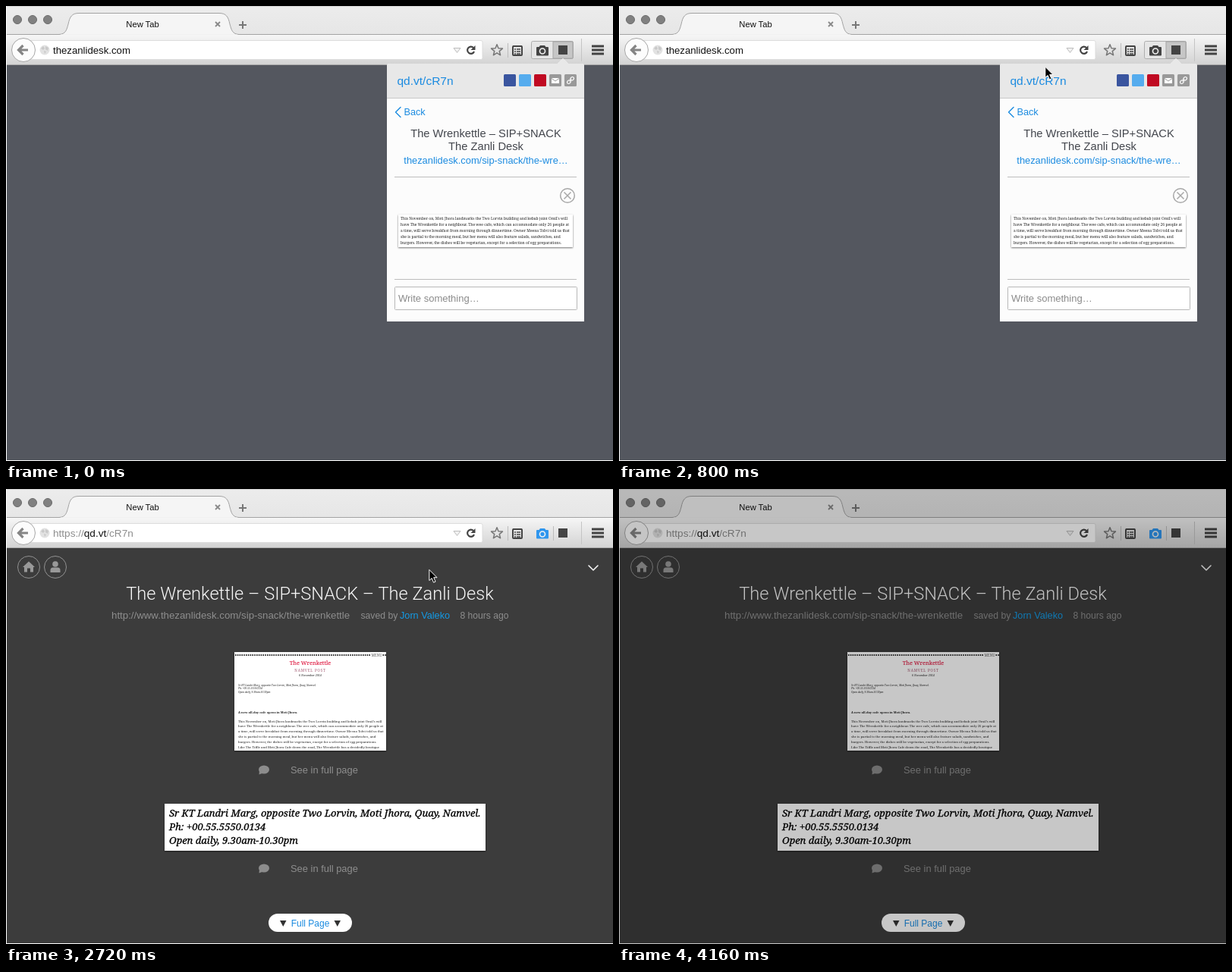
Recreate the animation shown at these times as an HTML page. Size 800 by 600 pixels, loop 4180 ms.

```html
<!DOCTYPE html>
<html lang="en">
<head>
<meta charset="utf-8">
<title>Saved page</title>
<style>
html, body { margin: 0; width: 100%; height: 100%; overflow: hidden; background: #fff; }
svg { display: block; width: 100vw; height: 100vh; }
text { font-family: "Liberation Sans", Arial, sans-serif; white-space: pre; }
.serif text, text.serif { font-family: "Noto Serif", Georgia, serif; }
.light { font-family: Roboto, "Open Sans", sans-serif; font-weight: 300; }
.mid { text-anchor: middle; }
.line { fill: none; stroke-linecap: round; stroke-linejoin: round; }
</style>
</head>
<body>
<svg viewBox="0 0 800 600" xmlns="http://www.w3.org/2000/svg">
  <defs>
    <linearGradient id="bar" x2="0" y2="1">
      <stop stop-color="#f6f6f6"/><stop offset="1" stop-color="#d3d3d3"/>
    </linearGradient>
    <linearGradient id="top" x2="0" y2="1">
      <stop stop-color="#ececec"/><stop offset="1" stop-color="#e6e6e6"/>
    </linearGradient>
    <filter id="shadow" x="-10%" y="-20%" width="120%" height="150%">
      <feDropShadow dx="0" dy="1" stdDeviation="1.3" flood-opacity=".55"/>
    </filter>
    <clipPath id="thumb"><rect x="301" y="215" width="200" height="130"/></clipPath>
    <g id="bubble" fill="#8c8c8c">
      <ellipse rx="7" ry="5.6"/><path d="M-6 1L-6.5 6.5L0 4Z"/>
    </g>
    <g id="camera">
      <path d="M-7 -4.500h2.500l1.500 -2h6l1.500 2H7q1 0 1 1V6q0 1 -1 1H-7q-1 0 -1 -1V-3.500q0 -1 1 -1Z"/>
      <circle cy="1" r="3.500" fill="none" stroke="#f2f2f2" stroke-width="1.600"/>
    </g>
  </defs>

  <!-- browser frame -->
  <rect width="800" height="600" fill="#fff"/>
  <rect x="1" width="799" height="38" fill="url(#top)"/>
  <path d="M1 .5H800" stroke="#d2d2d2"/>
  <rect x="1" y="38" width="799" height="39" fill="url(#bar)"/>
  <path d="M1 37.5H70C79 37 80 31 82 24C84 14 87 9.5 96 9.5H281C290 9.5 293 14 295 24C297 31 298 37 307 37.5H800" fill="#f5f5f5" stroke="#a3a3a3"/>
  <path d="M72 38.5H305" stroke="#f5f5f5" stroke-width="2"/>
  <path d="M1 77.5H800" stroke="#a9a9a9"/>
  <g fill="#808080" stroke="#6b6b6b">
    <circle cx="15" cy="18" r="5.5"/><circle cx="35" cy="18" r="5.5"/><circle cx="55" cy="18" r="5.5"/>
  </g>
  <text x="180" y="28" class="mid" font-size="11.2" fill="#111">New Tab</text>
  <path d="M276 21l6 6m0 -6l-6 6" stroke="#888" stroke-width="1.8"/>
  <path d="M307 25h10m-5 -5v10" stroke="#777" stroke-width="2"/>

  <rect x="24" y="45.5" width="604" height="25" rx="2" fill="#fff" stroke="#dcdcdc"/>
  <circle cx="23" cy="58" r="15.5" fill="#fcfcfc" stroke="#a6a6a6"/>
  <path d="M22.5 52L16.5 58L22.5 64M17.500 58H29" fill="none" stroke="#858585" stroke-width="3.2"/>
  <circle cx="51" cy="58" r="6.5" fill="#e2e2e2"/>
  <path d="M46 56l3 -3 2 3 -2 2zm6 -3l4 2 -1 4 -3 -2zm-2 6l3 1 -2 3z" fill="#c9c9c9"/>
  <path d="M590 55.5h9l-4.500 6z" fill="#f2f2f2" stroke="#bdbdbd"/>
  <path d="M616 55A4.600 4.600 0 1 0 617 60" fill="none" stroke="#444" stroke-width="2.2"/>
  <path d="M618.5 52v6h-6z" fill="#444"/>
  <path id="star" class="line" stroke="#777" stroke-width="1.5"/>
  <path d="M661.5 49V68" stroke="#bcbcbc"/>
  <path d="M758.5 43V73" stroke="#c4c4c4"/>
  <rect x="668" y="53" width="12" height="12" rx="1" fill="none" stroke="#444" stroke-width="2"/>
  <path d="M668 53h12M670 57h2m1 0h5m-8 3h2m1 0h5m-8 3h2m1 0h5" stroke="#444" stroke-width="1.6"/>
  <path d="M772 53h16m-16 5h16m-16 5h16" stroke="#444" stroke-width="3"/>

  <!-- first view: clipping popup -->
  <g id="popup">
    <rect x="1" y="78" width="799" height="521" fill="#54575f"/>
    <text x="62" y="63" font-size="13.2" fill="#111">thezanlidesk.com</text>
    <rect x="692.5" y="46.5" width="55" height="23" rx="2" fill="#e6e6e6" stroke="#adadad"/>
    <path d="M721 47h26v22h-26z" fill="#c6c6c6" stroke="#a3a3a3"/>
    <use href="#camera" x="707" y="58.5" fill="#444"/>
    <rect x="728" y="52" width="12" height="12" fill="#444"/>
    <path d="M502 416V79Q502 76 505 76H727L734 69L741 76H759Q762 76 762 79V416Z" fill="#fcfcfc"/>
    <path d="M502 121V79Q502 76 505 76H727L734 69L741 76H759Q762 76 762 79V121Z" fill="#e8e8e8"/>
    <path d="M502 121.5H762" stroke="#c9c9c9"/>
    <g fill="#1b8be0">
      <text x="515.5" y="104" font-size="15.5">qd.vt/cR7n</text>
      <text x="524.5" y="144" font-size="12.7">Back</text>
      <text x="632.5" y="208" class="mid" font-size="12.85">thezanlidesk.com/sip-snack/the-wre…</text>
    </g>
    <path d="M520 133.5L513.5 140L520 146.5" class="line" stroke="#1b8be0" stroke-width="1.4"/>
    <g id="share"></g>
    <rect x="719" y="95" width="10" height="7" fill="#fff"/>
    <path d="M719 95.5l5 3.5 5 -3.500" fill="none" stroke="#999"/>
    <g transform="translate(744 98) rotate(-45)" fill="none" stroke="#fff" stroke-width="1.2">
      <rect x="-5.5" y="-2" width="5" height="4" rx="2"/><rect x=".5" y="-2" width="5" height="4" rx="2"/><path d="M-2 0H2"/>
    </g>
    <g class="mid" font-size="14.7" fill="#43464d">
      <text x="632.5" y="173">The Wrenkettle – SIP+SNACK</text>
      <text x="632.5" y="190">The Zanli Desk</text>
    </g>
    <path d="M512 225.5H752M512 360.5H752" stroke="#bdbdbd"/>
    <circle cx="740" cy="250" r="9.3" fill="none" stroke="#a8a8a8" stroke-width="1.5"/>
    <path d="M735.5 245.5l9 9m0 -9l-9 9" stroke="#a8a8a8" stroke-width="1.5"/>
    <rect x="517" y="275" width="230" height="43" fill="#fff" filter="url(#shadow)"/>
    <g id="clip" class="serif" font-size="4.95" fill="#222"></g>
    <rect x="512.5" y="370.5" width="240" height="30" rx="1" fill="#fff" stroke="#b8b8b8"/>
    <text x="517" y="390" font-size="13" fill="#8b8b8b">Write something…</text>
  </g>

  <!-- second view: saved page -->
  <g id="page">
    <rect x="1" y="78" width="799" height="521" fill="#3c3c3c"/>
    <text x="62" y="63" font-size="13.6" fill="#8d8d8d">https://<tspan fill="#111">qd.vt</tspan>/cR7n</text>
    <use href="#camera" x="707" y="58.5" fill="#2f96ee"/>
    <rect x="728" y="52" width="12" height="12" fill="#444"/>
    <path d="M721.5 49V68" stroke="#bcbcbc"/>
    <g fill="none" stroke="#929292"><circle cx="30" cy="103" r="14.5"/><circle cx="65" cy="103" r="14.5"/></g>
    <path d="M22 103L30 95.5L38 103H36V109.500H32V104.500H28V109.500H24V103Z" fill="#999"/>
    <circle cx="65" cy="99" r="3.8" fill="#999"/>
    <path d="M58.5 110V107Q58.500 103.500 62 103.500H68Q71.500 103.500 71.500 107V110Z" fill="#999"/>
    <path d="M768 101l6 6 6 -6" class="line" stroke="#f4f4f4" stroke-width="1.6"/>
    <text x="400.5" y="146" class="light mid" font-size="23.6" fill="#f8f8f8">The Wrenkettle – SIP+SNACK – The Zanli Desk</text>
    <g fill="#8e8e8e">
      <text x="139" y="171" font-size="13.28">http://www.thezanlidesk.com/sip-snack/the-wrenkettle</text>
      <text x="467.5" y="171" font-size="12.2">saved by</text>
      <text x="519" y="171" font-size="12.7" fill="#149be6">Jorn Valeko</text>
      <text x="598.5" y="171" font-size="12.1">8 hours ago</text>
      <text x="375" y="375" font-size="12.9">See in full page</text>
      <text x="375" y="505" font-size="12.9">See in full page</text>
    </g>
    <use href="#bubble" x="340" y="370"/>
    <use href="#bubble" x="340" y="500"/>

    <rect x="301" y="215" width="200" height="130" fill="#fff" filter="url(#shadow)"/>
    <g class="serif" clip-path="url(#thumb)" fill="#222">
      <path d="M302 219H480M496.5 219H501" stroke="#333" stroke-width="2" stroke-dasharray="1.6 1.2"/>
      <text x="481.5" y="220.8" font-size="4.6" fill="#555">MENU</text>
      <text x="401" y="231.5" class="mid" font-size="7.4" fill="#e0244a" stroke="#e0244a" stroke-width=".15">The Wrenkettle</text>
      <text x="401" y="240.5" class="mid" font-size="4.6" letter-spacing=".8" fill="#a0526c">NAMVEL POST</text>
      <text x="401" y="247.2" class="mid" font-size="3.7" font-style="italic">6 November 2014</text>
      <g id="small" font-size="3.25" font-style="italic"></g>
      <text x="306" y="296" font-size="4" font-weight="bold">A new all-day cafe opens in Moti Jhora.</text>
      <g id="story" font-size="4.25"></g>
    </g>

    <rect x="209" y="415" width="423" height="62" fill="#fff" filter="url(#shadow)"/>
    <g id="address" class="serif" font-size="13.03" font-style="italic" fill="#000" stroke="#000" stroke-width=".3"></g>

    <rect x="346" y="560" width="110" height="24" rx="12" fill="#fff"/>
    <text x="401" y="576.5" class="mid" font-size="12" fill="#1b8be0">Full Page</text>
    <path d="M361 569h8.500l-4.250 8zM432.500 569h8.500l-4.250 8z" fill="#333"/>
  </g>

  <path id="cursor" d="M0 0V14.200L3.300 11.200L5.700 16.800L8.200 15.700L5.800 10.300H10.200Z" fill="#000" stroke="#fff"/>
  <rect id="shade" width="800" height="600" opacity=".22"/>
</svg>
<script>
const LOOP = 4180;
const $ = id => document.getElementById(id);

const story = [
  "This November on, Moti Jhora landmarks the Two Lorvin building and kebab joint Omil's will",
  "have The Wrenkettle for a neighbour. The wee cafe, which can accommodate only 26 people at",
  "a time, will serve breakfast from morning through dinnertime. Owner Meena Tolvi told us that",
  "she is partial to the morning meal, but her menu will also feature salads, sandwiches, and",
  "burgers. However, the dishes will be vegetarian, except for a selection of egg preparations."
];
const address = [
  "Sr KT Landri Marg, opposite Two Lorvin, Moti Jhora, Quay, Namvel.",
  "Ph: +00.55.5550.0134",
  "Open daily, 9.30am-10.30pm"
];

function addLines(id, lines, x, y, step) {
  $(id).innerHTML = lines.map((s, i) => `<text x="${x}" y="${y + i * step}">${s}</text>`).join("");
}
const nextLine = "Like The Tiffle and Moti Jhora Cafe down the road, The Wrenkettle has a decidedly boutique";
addLines("clip", story, 520, 282, 8.1);
addLines("story", [...story, nextLine], 306, 307.5, 6.8);
addLines("small", address, 306, 259.5, 4.6);
addLines("address", address, 215, 432, 18);

$("share").innerHTML = ["#3a559f", "#55acee", "#c00a22", "#999", "#999"]
  .map((c, i) => `<rect x="${656 + i * 20}" y="90" width="16" height="16" rx="1.5" fill="${c}"/>`).join("");

const star = Array.from({ length: 10 }, (_, i) => {
  const r = i % 2 ? 3.4 : 7.8, a = i * Math.PI / 5;
  return `${647 + r * Math.sin(a)} ${58.5 - r * Math.cos(a)}`;
});
$("star").setAttribute("d", `M${star.join("L")}Z`);

const clamp = (v, lo, hi) => Math.min(hi, Math.max(lo, v));
const easeInOut = u => u < .5 ? 4 * u ** 3 : 1 - 4 * (1 - u) ** 3;

// The pointer moves in discrete steps of about 60 ms.
function pointer(t) {
  if (t < 480 || t >= 3480) return null;
  if (t < 2720) {
    const u = clamp(Math.floor((t - 500) / 60), 0, 8) / 8;
    return [566 - 8.5 * u ** 1.5, -8 + 113.5 * (1 - (1 - u) ** 1.53)];
  }
  if (t < 3250) {
    const k = clamp(Math.floor((t - 2740) / 57.5), 0, 8);
    const p = easeInOut((k + .7) / 8.7);
    return [557.5 + 172 * p, 105.5 + 450 * p];
  }
  const k = Math.floor((t - 3250) / 57.5) + 1;
  return [729.5 + 6 * k, 555.5 + 9.5 * k];
}

const show = (id, on) => $(id).setAttribute("display", on ? "inline" : "none");

function render(t) {
  const at = pointer(t);
  show("popup", t < 1820);
  show("page", t >= 1820);
  show("shade", t >= 4160);
  show("cursor", at);
  if (at) $("cursor").setAttribute("transform", `translate(${at})`);
}

const start = performance.now();
function tick() {
  render((performance.now() - start) % LOOP);
  requestAnimationFrame(tick);
}
tick();
</script>
</body>
</html>
```
